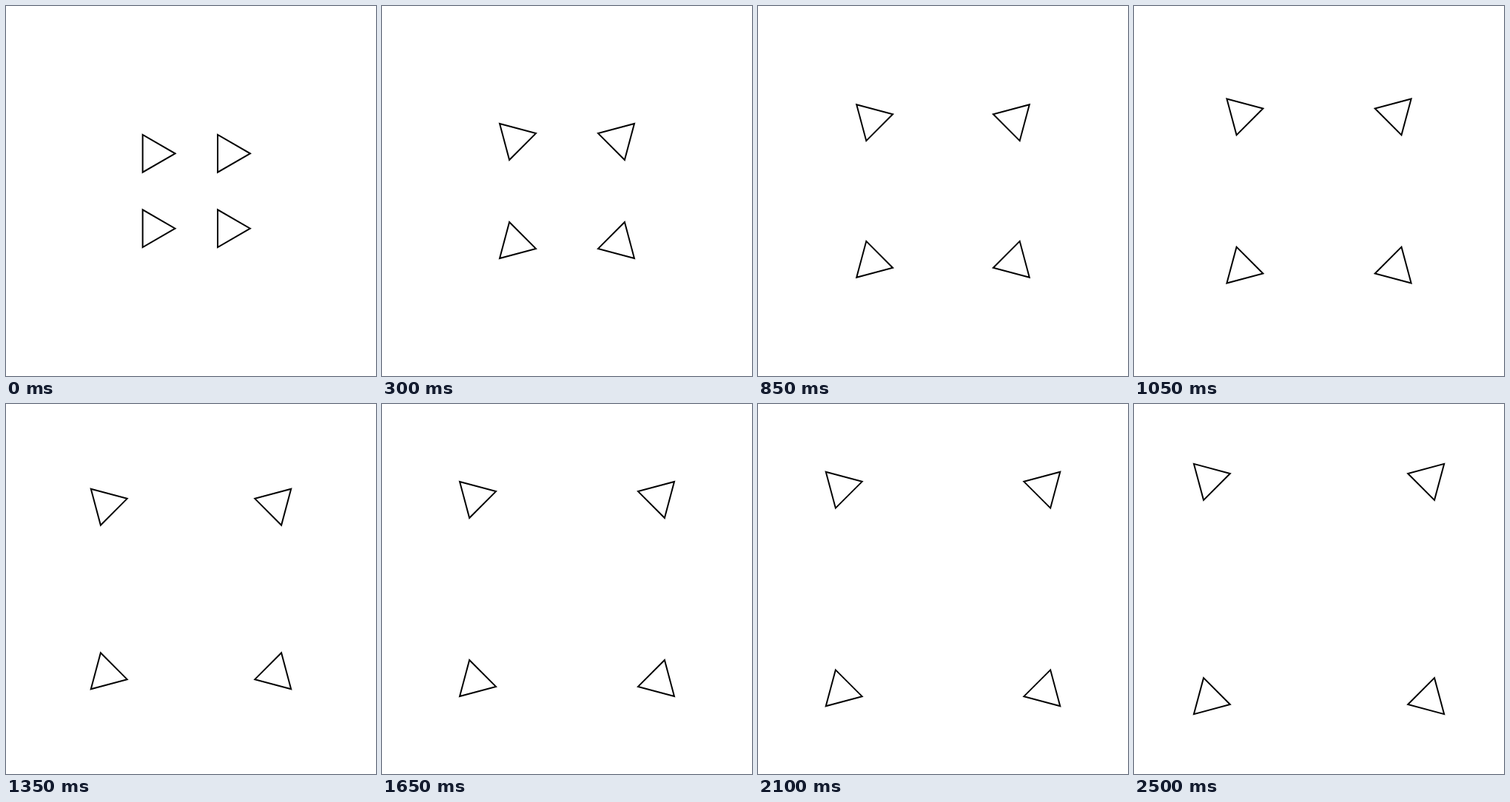
An HTML page without scripts for the animation above (2550 ms loop, 500 by 500 pixels).

```html
<!DOCTYPE html>
<html lang="en">
<head>
<meta charset="utf-8">
<title>Repelling triangles</title>
<style>
  @property --step {
    syntax: "<number>";
    inherits: true;
    initial-value: 0;
  }
  html, body {
    margin: 0;
    width: 100%;
    height: 100%;
    overflow: hidden;
    background: #fff;
  }
  svg {
    display: block;
    width: 100%;
    height: 100%;
    animation: advance 2550ms steps(51, end) infinite;
  }
  @keyframes advance {
    from { --step: 0; }
    to { --step: 51; }
  }
  /* Repulsion falls off with distance, so the squared distance grows almost linearly. */
  .mover {
    --distance: calc(1px * sqrt(2570 + 385 * var(--step) + 96.25 * log(1 + 0.15 * var(--step))));
    fill: none;
    stroke: #000;
    stroke-width: 2;
    stroke-linejoin: miter;
    transform-origin: 0 0;
    /* At rest every triangle faces right; once moving, it faces its direction of travel. */
    transform:
      translate(calc(var(--x) * var(--distance)), calc(var(--y) * var(--distance)))
      rotate(calc(var(--heading) * min(1, var(--step))));
  }
</style>
</head>
<body>
<svg viewBox="-250 -250 500 500">
  <defs>
    <path id="triangle" d="M29.26 0L-14.63 25.34V-25.34Z"/>
  </defs>
  <g class="mover" style="--x:-1; --y:-1; --heading:225deg"><use href="#triangle"/></g>
  <g class="mover" style="--x:1; --y:-1; --heading:315deg"><use href="#triangle"/></g>
  <g class="mover" style="--x:-1; --y:1; --heading:135deg"><use href="#triangle"/></g>
  <g class="mover" style="--x:1; --y:1; --heading:45deg"><use href="#triangle"/></g>
</svg>
</body>
</html>
```
